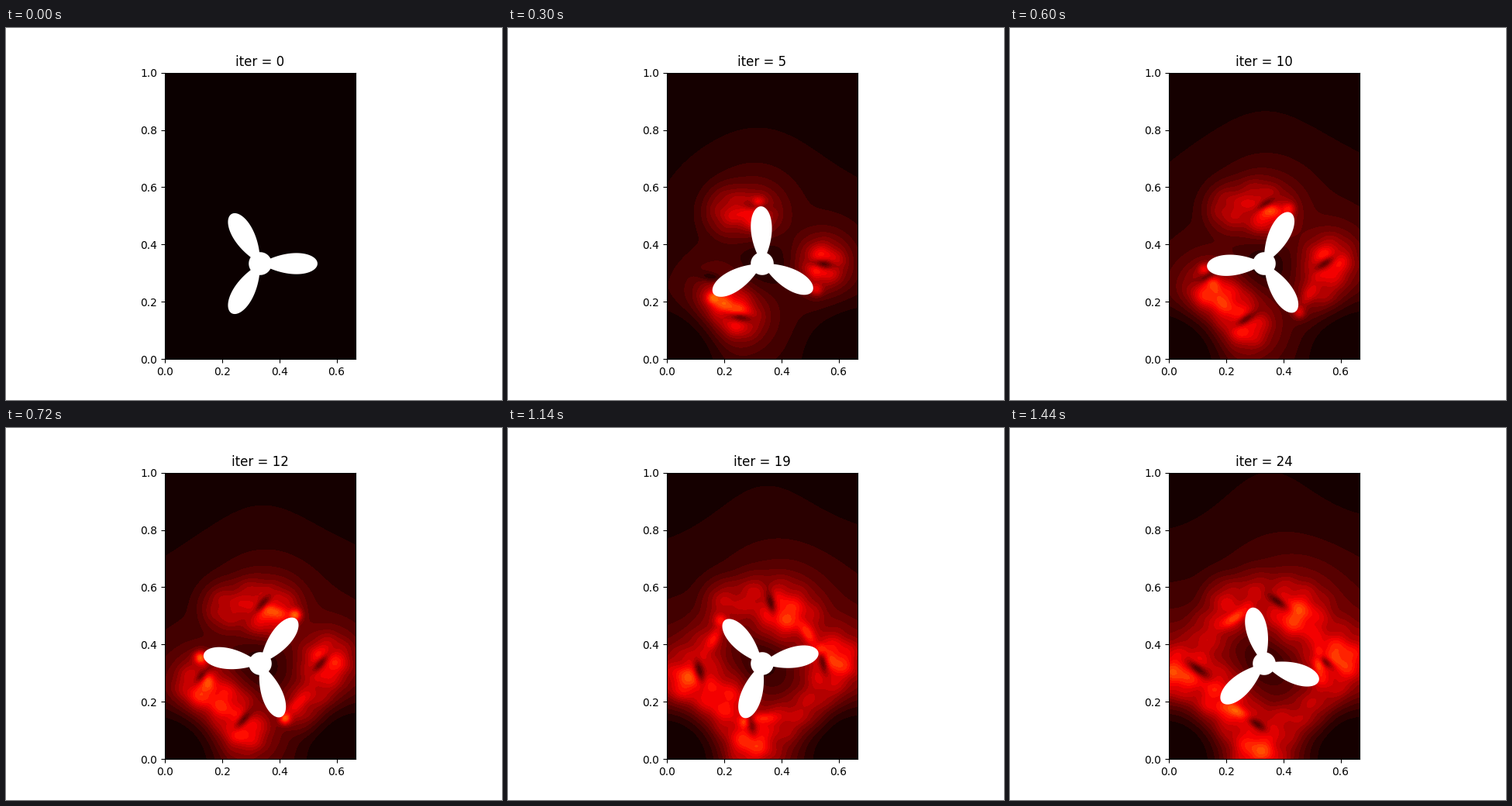
A matplotlib script for the animation above (1500 ms loop, 640 by 480 pixels).

```python
import numpy as np
import matplotlib.pyplot as plt
from matplotlib.animation import FuncAnimation

FRAMES, INTERVAL = 25, 60
WIDTH, HEIGHT = 2 / 3, 1.0
HUB = (1 / 3, 1 / 3)
BLADE = 0.2
SPIN = 0.1          # radians per iteration, clockwise
BANDS = 30

X, Y = np.meshgrid(np.linspace(0, WIDTH, 135), np.linspace(0, HEIGHT, 201))

# Straight drift of each wake and each calm vortex core: (start, end)
WAKES = [((.27, .51), (.44, .50)), ((.53, .33), (.60, .35)),
         ((.23, .18), (.03, .30)), ((.24, .18), (.31, .03)),
         ((.24, .18), (.19, .22))]
CORES = [((.30, .53), (.38, .55)), ((.545, .33), (.545, .34)),
         ((.17, .28), (.10, .315)), ((.245, .15), (.305, .125))]


def drift(path, p):
    (x0, y0), (x1, y1) = path
    return x0 + (x1 - x0) * p, y0 + (y1 - y0) * p


def polar(r, a):
    return HUB[0] + r * np.cos(a), HUB[1] + r * np.sin(a)


def tip_angle(blade, n):
    return 2 * np.pi * blade / 3 - SPIN * n


def gauss(center, sx, sy, tilt=0):
    dx, dy = X - center[0], Y - center[1]
    u = dx * np.cos(tilt) + dy * np.sin(tilt)
    v = dy * np.cos(tilt) - dx * np.sin(tilt)
    return np.exp(-((u / sx) ** 2 + (v / sy) ** 2) / 2)


def wake(center, size):
    """Flat core with a long, slowly fading tail."""
    r = np.hypot(X - center[0], Y - center[1]) / size
    return 11 * (1 + r ** 3) ** (-1.3 / 3)


def trail(blade, n):
    """Puffs left along the arc that one blade tip has swept."""
    for born in range(0, n, 4):
        age = n - born
        spot = polar(BLADE + .002 * age, tip_angle(blade, born))
        yield 8 * min(1, age / 4) * gauss(spot, .075, .075)


def speed(n):
    p = n / (FRAMES - 1)
    parts = [wake(drift(path, p), .035 + .047 * p ** .8) for path in WAKES]
    for blade in range(3):
        parts += trail(blade, n)
    field = sum(part ** 4 for part in parts) ** .25

    for cx in (0, WIDTH):
        low = np.hypot(X - cx, Y)
        high = np.hypot(X - cx, Y - HEIGHT)
        field *= 1 - np.exp(-(low / .19) ** 4)
        field *= 1 - .45 * np.exp(-(high / .23) ** 2)
    field *= 1 - .65 * gauss(HUB, .07, .07)

    # Turbulence shows only where the flow is fast
    ripple = np.sin(50 * X + 25 * Y) * np.sin(55 * Y - 20 * X + .15 * n)
    field += .18 * np.maximum(field - 4, 0) * ripple

    for path in CORES:
        field *= 1 - .75 * gauss(drift(path, p), .032, .013, .14 * (n - 6))
    for path in WAKES[:4]:
        field += 2.5 * p * gauss(drift(path, p), .035, .03)

    flare = 4 + 5 * np.cos(2 * np.pi * (n - 3) / 9)
    for blade in range(3):
        a = tip_angle(blade, n)
        field += max(flare, 0) * gauss(polar(.21, a + .05), .014, .014)
        field += 6 * p * gauss(polar(.19, a + .36), .013, .035, a + .36)
    return np.clip(field, 0, BANDS - .01)


def rotor(n):
    """Three-petal rose joined to a round hub."""
    t = np.linspace(0, 2 * np.pi, 721)
    r = np.maximum(.04, BLADE * np.cos(3 * t))
    return np.column_stack(polar(r, t - SPIN * n))


fig, ax = plt.subplots(figsize=(6.4, 4.8), dpi=100)
ax.set_aspect("equal")
ax.set_xlim(0, WIDTH)
ax.set_ylim(0, HEIGHT)
ax.set_xticks(np.arange(0, WIDTH, .2))
ax.set_facecolor(plt.get_cmap("hot")(0))
blades = plt.Polygon(rotor(0), fc="white", ec="none", zorder=2)
ax.add_patch(blades)
title = ax.set_title("iter = 0")


def draw(n):
    for old in list(ax.collections):
        old.remove()
    if n > 0:
        ax.contourf(X, Y, speed(n), levels=np.arange(BANDS + 1), cmap="hot")
    blades.set_xy(rotor(n))
    title.set_text(f"iter = {n}")
    return blades, title


anim = FuncAnimation(fig, draw, frames=FRAMES, interval=INTERVAL,
                     repeat=True, repeat_delay=0)
plt.show()
```
